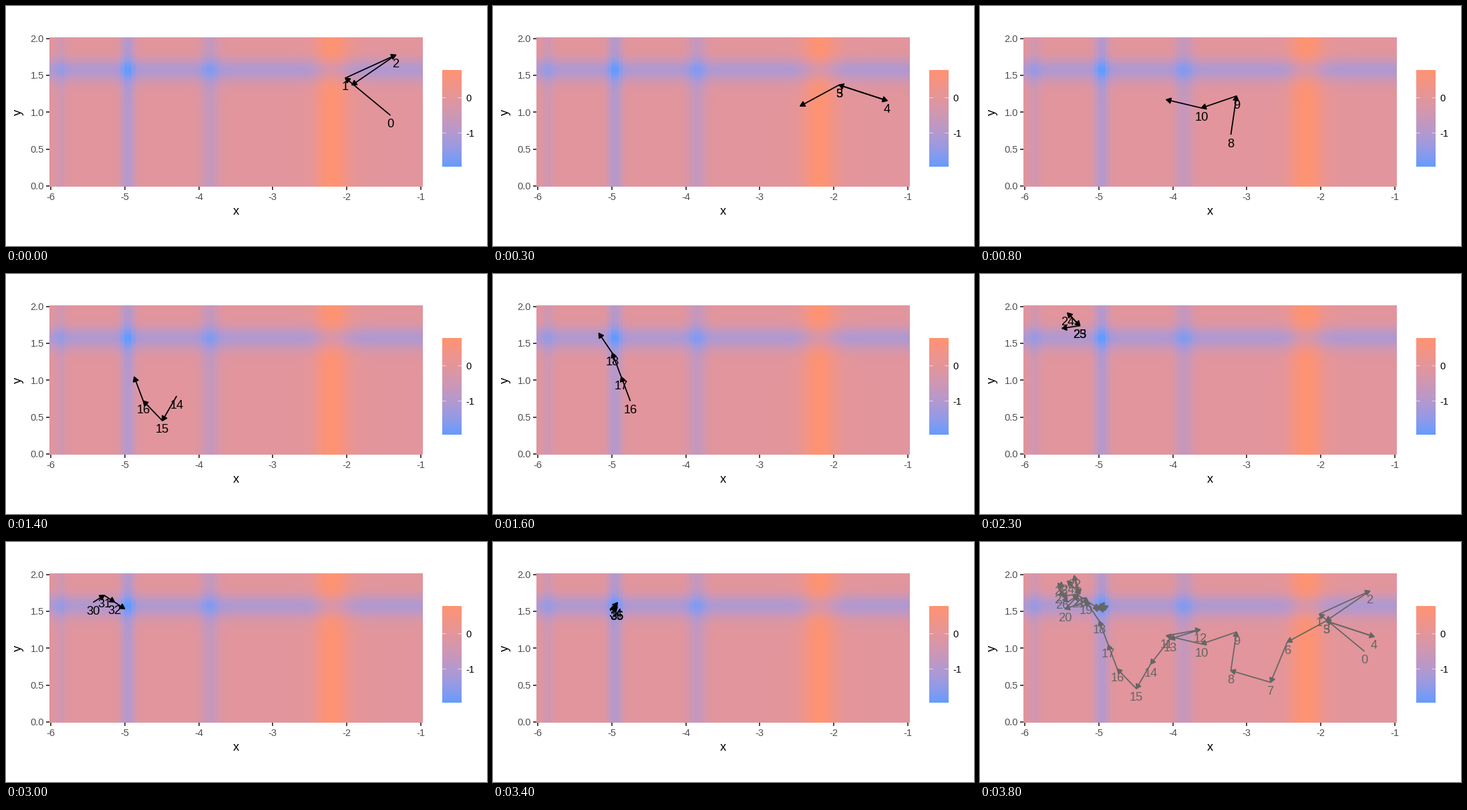
Recreate the animation shown at these times as a matplotlib script. Size 720 by 360 pixels, loop 3900 ms.

```python
import numpy as np
import matplotlib.pyplot as plt
from matplotlib.animation import FuncAnimation
from matplotlib.patches import Polygon, Rectangle

W, H, DPI = 720, 360, 120
LINE = 1.07                         # points
SMALL, BIG = 8.8, 11                # font sizes in points
UNIT, X0, Y0 = 110.65, 67.3, 270.0  # pixels per data unit, place of (-6, 0)
LOW, HIGH = (97, 156, 255), (255, 147, 114)
FRAMES, TRAIL = 39, 3
HEAD = 7.5                          # arrow head edge, pixels
LAST_LABEL = 28                     # highest label in the closing overview

plt.rcParams["font.family"] = "Liberation Sans"


def make_path():
    """Search path in pixels: key points, returns, even runs, random jitter."""
    rng = np.random.default_rng(4)
    hub, nest, gate = (518, 118.5), (149.5, 77.5), (147, 80)
    return np.array([
        (575.5, 164), (508, 108), (583.5, 73.5), hub, (590, 142), hub,
        (460, 150), (435, 210.5), (375.5, 193), (384, 135), (331.5, 153),
        (279, 140.5), (329.5, 131.5), (284.5, 145.5), (255.5, 183),
        (234, 220), *np.linspace((205.5, 190.5), (178.5, 118.5), 3),
        (158.5, 89), (127.5, 100.5), gate, (141, 50.5),
        nest, (131, 58.5), nest, (123, 81.5),
        *rng.uniform((110, 58), (122, 88), (3, 2)),
        (130.5, 90.5), *np.linspace(gate, (177.5, 100), 3),
        *rng.uniform((166, 93), (188, 103), (7, 2))])


# Linear RGB to XYZ, scaled to the white point
TO_XYZ = np.array([[0.4124, 0.3576, 0.1805],
                   [0.2126, 0.7152, 0.0722],
                   [0.0193, 0.1192, 0.9505]])
TO_XYZ /= TO_XYZ.sum(axis=1, keepdims=True)


def to_lab(rgb):
    c = np.array(rgb) / 255
    c = np.where(c > 0.04045, ((c + 0.055) / 1.055) ** 2.4, c / 12.92)
    x, y, z = np.cbrt(TO_XYZ @ c)
    return np.array([116 * y - 16, 500 * (x - y), 200 * (y - z)])


def to_rgb(lab):
    fy = (lab[..., 0] + 16) / 116
    f = np.stack([fy + lab[..., 1] / 500, fy, fy - lab[..., 2] / 200], -1)
    c = np.clip(f ** 3 @ np.linalg.inv(TO_XYZ).T, 0, 1)
    c = np.where(c > 0.0031308, 1.055 * c ** (1 / 2.4) - 0.055, 12.92 * c)
    return np.clip(c, 0, 1)


def blend(t):
    a, b = to_lab(LOW), to_lab(HIGH)
    return to_rgb(a + np.asarray(t)[..., None] * (b - a))


def surface(x, y):
    return -(np.sin(x) * np.sin(x ** 2 / np.pi) ** 20
             + np.sin(y) * np.sin(2 * y ** 2 / np.pi) ** 20)


def px(x):
    return X0 + (x + 6) * UNIT


def py(y):
    return Y0 - y * UNIT


fig = plt.figure(figsize=(W / DPI, H / DPI), dpi=DPI, facecolor="white")
ax = fig.add_axes([0, 0, 1, 1])


def show_image(rgb, extent):
    ax.imshow(rgb, origin="lower", extent=extent, interpolation="nearest",
              aspect="auto")


def write(x, y, text, size=BIG, **style):
    return ax.text(x, y, text, size=size, va="baseline", **style)


# Heat map
left, right, bottom, top = 65, 624, 271, 47
gx, gy = np.meshgrid(np.linspace(-6, -1, 100), np.linspace(0, 2, 100))
z = surface(gx, gy)
show_image(blend((z - z.min()) / np.ptp(z)), (left, right, bottom, top))

# Colour bar
bar_left, bar_right = 653, 682
show_image(blend(np.linspace(0, 1, 300))[:, None],
           (bar_left, bar_right, 241.4, 97.4))
for y, name in ((137.8, "0"), (190.6, "-1")):
    for x in (bar_left, bar_right - 5.76):
        ax.plot([x, x + 5.76], [y, y], color="white", lw=0.375,
                solid_capstyle="butt", snap=False)
    write(688, y + 5.4, name, SMALL)

# Axes
GREY = "#4D4D4D"
TICK = dict(color="#333333", lw=LINE, solid_capstyle="butt")
for v in range(-6, 0):
    ax.plot([px(v)] * 2, [bottom, bottom + 4.6], **TICK)
    write(px(v), 290.8, str(v), SMALL, color=GREY, ha="center")
for v in np.arange(0, 2.1, 0.5):
    ax.plot([left - 4.6, left], [py(v)] * 2, **TICK)
    write(57, py(v) + 5.2, f"{v:.1f}", SMALL, color=GREY, ha="right")
write(344, 312.7, "x", ha="center")
write(22.7, 159, "y", ha="center", rotation=90, rotation_mode="anchor")

ax.set_xlim(0, W)
ax.set_ylim(H, 0)
ax.axis("off")

panel = Rectangle((left, top), right - left, bottom - top,
                  transform=ax.transData)


def make_arrow(a, b):
    shaft, = ax.plot(*zip(a, b), lw=LINE, solid_capstyle="butt", zorder=3)
    dx, dy = a - b
    angle = np.arctan2(dy, dx)
    wings = [b + HEAD * np.array([np.cos(angle + s), np.sin(angle + s)])
             for s in (-np.pi / 6, np.pi / 6)]
    head = ax.add_patch(Polygon([wings[0], b, wings[1]], lw=LINE,
                                joinstyle="round", zorder=3))
    for part in (shaft, head):
        part.set_clip_path(panel)
    return shaft, head


path = make_path()
arrows = [make_arrow(a, b) for a, b in zip(path[:-1], path[1:])]
labels = [write(x, y + 18.5, str(i), ha="center", zorder=4)
          for i, (x, y) in enumerate(path[:-1])]


def draw(n):
    overview = n == FRAMES - 1
    color = "#666666" if overview else "black"
    for i, (parts, label) in enumerate(zip(arrows, labels)):
        shown = overview or n <= i < n + TRAIL
        for part in parts:
            part.set_visible(shown)
            part.set_color(color)
        label.set_visible(shown and not (overview and i > LAST_LABEL))
        label.set_color(color)
    return []


anim = FuncAnimation(fig, draw, frames=FRAMES, interval=100,
                     init_func=lambda: draw(0), repeat=True, repeat_delay=0)
plt.show()
```
